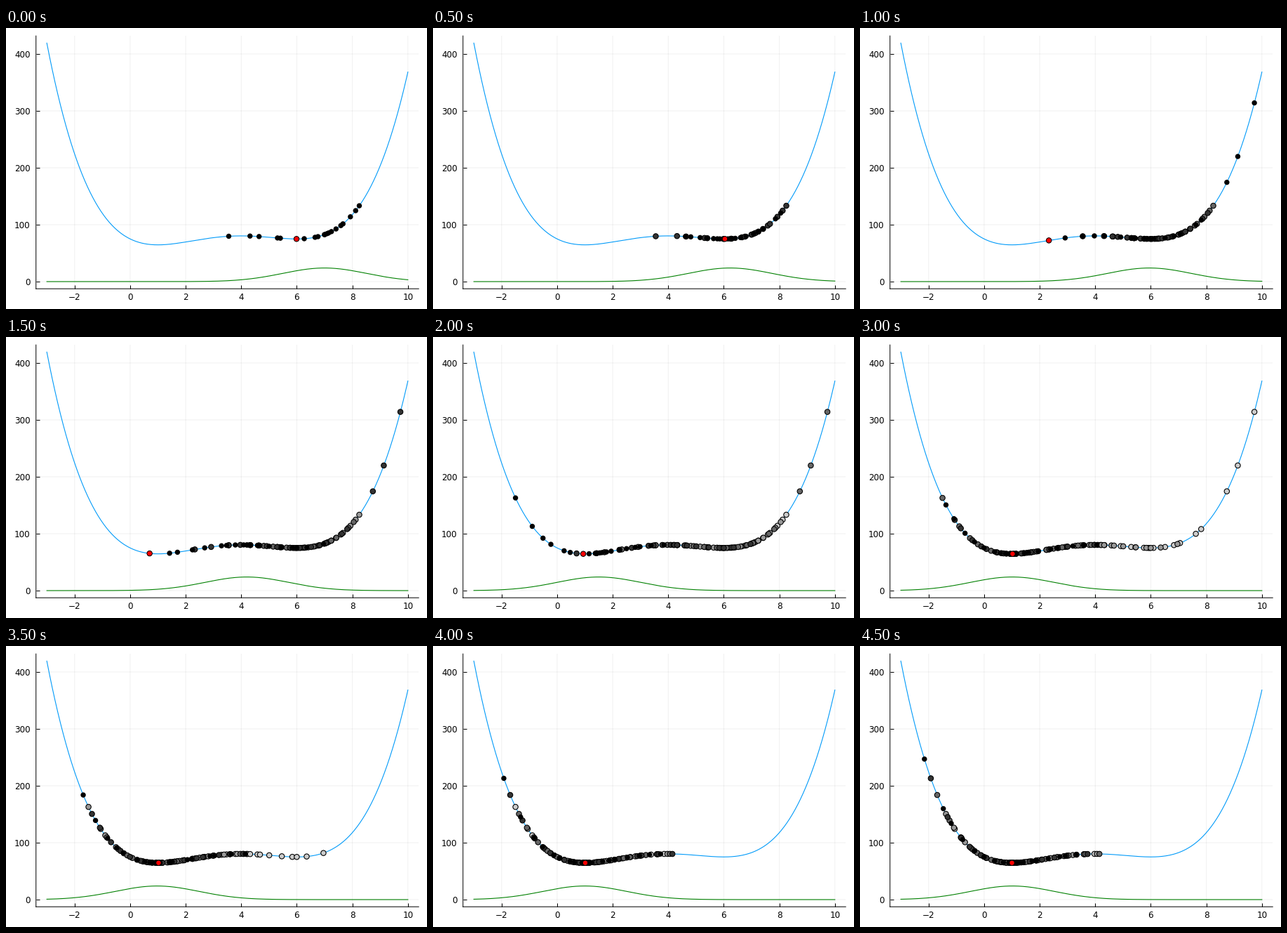
Animation of 600 by 400 pixels, one loop 5000 ms. Source, as a matplotlib script:

```python
import numpy as np
import matplotlib.pyplot as plt
from matplotlib.animation import FuncAnimation

W, H, DPI = 600, 400, 100
PX = 72 / DPI          # one pixel in points
GENS = 10
COUNT = 20             # samples per generation
LIFE = 5               # generations a sample stays visible
SIGMA = 1.5

plt.rcParams["font.family"] = "DejaVu Sans"

# The search drifts from the right valley to the left one, then settles
KEY_GENS = [0, 1, 2, 3, 4, 5, 7, 9]
KEY_MEAN = [7, 6.23, 5.95, 4.2, 1.5, 1.05, 0.97, 1.02]
KEY_LOW = [3.55, 4.62, 2.33, 0.7, -1.5, -1.06, -1.69, -2.15]
KEY_HIGH = [8.25, 8.05, 9.73, 6.96, 3.85, 3.97, 4.15, 3.3]

gens = np.arange(GENS)
means, lows, highs = (np.interp(gens, KEY_GENS, key)
                      for key in (KEY_MEAN, KEY_LOW, KEY_HIGH))
rng = np.random.default_rng(4)


def cost(x):
    return x**4 / 4 - 11 * x**3 / 3 + 17 * x**2 - 24 * x + 75


def density(x, mean):
    z = (x - mean) / SIGMA
    return 90 * np.exp(-z * z / 2) / (SIGMA * np.sqrt(2 * np.pi))


def draw_samples(mean, low, high):
    """Jittered samples from low to high, denser near the mean."""
    u = np.linspace(-1, 1, COUNT)
    u[1:-1] += rng.uniform(-0.045, 0.045, COUNT - 2)
    reach = np.where(u < 0, mean - low, high - mean)
    return mean + reach * np.sign(u) * np.abs(u) ** 1.6


samples = [draw_samples(*row) for row in zip(means, lows, highs)]
xs = np.linspace(-3, 10, 400)

fig = plt.figure(figsize=(W / DPI, H / DPI), dpi=DPI, facecolor="white")
left, right, top, bottom = 42.75, 588.2, 11.2, 371.2
ax = fig.add_axes([left / W, 1 - bottom / H, (right - left) / W,
                   (bottom - top) / H])
ax.set_xlim(-3.39, 10.39)
ax.set_ylim(-12.58, 431.83)
ax.set_xticks(range(-2, 11, 2))
ax.set_yticks(range(0, 401, 100))
ax.set_axisbelow(True)
ax.grid(color="black", alpha=0.06, linewidth=PX)
ax.tick_params(direction="in", length=5 * PX, width=PX, labelsize=12 * PX)
ax.tick_params(axis="x", pad=6 * PX)
ax.tick_params(axis="y", pad=8 * PX)
for side in ("top", "right"):
    ax.spines[side].set_visible(False)
for side in ("left", "bottom"):
    ax.spines[side].set_linewidth(PX)
    ax.spines[side].set_snap(False)
for line in [*ax.get_xgridlines(), *ax.get_ygridlines()]:
    line.set_snap(False)

ax.plot(xs, cost(xs), color="#009AF9", linewidth=1.1 * PX)
bell, = ax.plot([], [], color="#008000", linewidth=1.1 * PX)
dots = ax.scatter([], [], s=(7.4 * PX) ** 2, edgecolors="black", zorder=5)


def update(gen):
    bell.set_data(xs, density(xs, means[gen]))
    x, fills, edges = [], [], []
    for age in range(min(gen, LIFE - 1), -1, -1):
        x.extend(samples[gen - age])
        fills += [(age / LIFE,) * 3] * COUNT
        edges += [1.1 * PX if age else 0] * COUNT
    now = samples[gen]
    x = np.array([*x, now[np.argmin(cost(now))]])
    dots.set_offsets(np.column_stack([x, cost(x)]))
    dots.set_facecolor(fills + [(1, 0, 0)])
    dots.set_linewidths(edges + [PX])
    return bell, dots


anim = FuncAnimation(fig, update, frames=GENS, interval=500,
                     repeat=True, repeat_delay=0)
plt.show()
```
